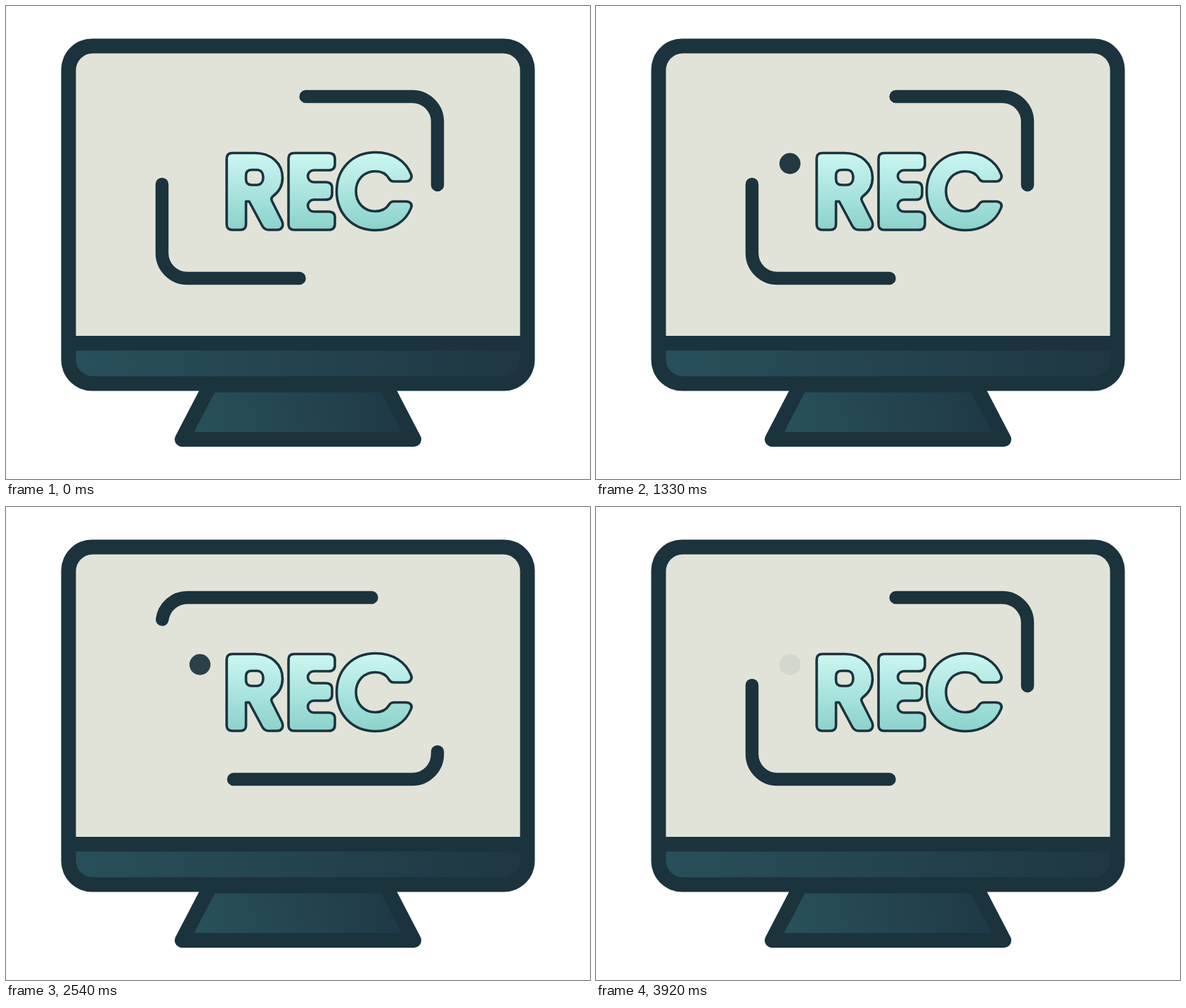
Write an HTML page with a canvas that moves like this. It is 831 px wide and 674 px high and loops after 4000 ms.

```html
<!DOCTYPE html>
<html lang="en">
<head>
<meta charset="utf-8">
<title>Recording monitor</title>
<style>
  html, body { margin: 0; width: 100%; height: 100%; overflow: hidden; background: #fff; }
  canvas { display: block; width: 831px; height: 674px; }
</style>
</head>
<body>
<canvas id="stage" width="831" height="674"></canvas>
<script>
const ctx = document.getElementById('stage').getContext('2d');
const LOOP = 4000, FPS = 24;
const DARK = '#1b333d', SCREEN = '#e1e3d9';
const DASH = 314, TURNS = 3;

// [frame, opacity] of the record dot
const DOT = [
  [1, 0], [9, 1], [12, 1], [18.3, 0], [25, 0], [32, .96], [37, .96], [43.5, .04],
  [46, .04], [47, 0], [49, 0], [56, .96], [60, .96], [68, .05],
  [72, .05], [79, .96], [86, .96], [94, .07], [96, .07]
];

const LETTERS = [
  // R
  'M322 209.5H354C377 209.5 393.5 224 393.5 245C393.5 257 388 265 380 271' +
  'C377.5 273 377 275 378.5 278L392.5 306C395.5 313 393 319 385.5 319H374' +
  'C369 319 366.5 317 364.5 313L346 278.5H341.5V311Q341.5 319 333.5 319H322' +
  'Q314 319 314 311V217.5Q314 209.5 322 209.5Z' +
  'M350 233.5H357C363 233.5 366 238 366 244S363 255 357 255H350' +
  'C344 255 341.5 252 341.5 247V241C341.5 236 344 233.5 350 233.5Z',
  // E
  'M410 209.5H459Q468 209.5 468 218V225.5Q468 234 459 234H438' +
  'A8.5 8.5 0 0 0 438 251H455Q464 251 464 259.5V267.5Q464 276 455 276H438' +
  'A8.5 8.5 0 0 0 438 293H459Q468 293 468 301.5V310.5Q468 319 459 319H410' +
  'Q402 319 402 311V217.5Q402 209.5 410 209.5Z',
  // C
  'M576.5 240C578.5 245 575 250 569 250H552C548.5 250 546.5 248.5 545 246' +
  'C541 239 534 235.5 525.5 235.5C509 235.5 498 248 498 264S509 292.5 525.5 292.5' +
  'C534 292.5 541 289 545 282.5C546.5 280 548.5 278.5 552 278.5H569' +
  'C575 278.5 578.5 282 576.5 287.5C569 307 550 319.5 526 319.5' +
  'C493 319.5 470.5 296 470.5 264S493 208.5 526 208.5C550 208.5 569 220.5 576.5 240Z'
].map(d => new Path2D(d));

// Clockwise from the lower end of the top right corner
const FRAME = new Path2D(
  'M614 165V352A36 36 0 0 1 578 388H258A36 36 0 0 1 222 352V165' +
  'A36 36 0 0 1 258 129H578A36 36 0 0 1 614 165');

const STAND = new Path2D('M290.8 540L250.5 617.5H580.5L540.2 540Z');

function gradient(x0, y0, x1, y1, from, to) {
  const g = ctx.createLinearGradient(x0, y0, x1, y1);
  g.addColorStop(0, from);
  g.addColorStop(1, to);
  return g;
}

const BEZEL_FILL = gradient(100, 0, 731, 0, '#28505a', '#1f3743');
const STAND_FILL = gradient(280, 600, 545, 550, '#285059', '#1f3a46');
const TEXT_FILL = gradient(0, 209, 0, 319, '#cbf7f2', '#8bd2cc');

const smooth = x => {
  x = Math.min(1, Math.max(0, x));
  return x * x * (3 - 2 * x);
};

function dotAlpha(f) {
  const i = DOT.findIndex(k => k[0] > f);
  if (i <= 0) return 0;
  const [f0, a0] = DOT[i - 1], [f1, a1] = DOT[i];
  return a0 + (a1 - a0) * smooth((f - f0) / (f1 - f0));
}

function box(x, y, w, h, radii, fill) {
  ctx.beginPath();
  ctx.roundRect(x, y, w, h, radii);
  ctx.fillStyle = fill;
  ctx.fill();
}

function drawMonitor() {
  ctx.lineJoin = 'round';
  ctx.lineWidth = 21;
  ctx.strokeStyle = DARK;
  ctx.fillStyle = STAND_FILL;
  ctx.fill(STAND);
  ctx.stroke(STAND);
  box(78.5, 46.5, 674, 502, 44, DARK);
  box(99.5, 67.5, 632, 402.5, [24, 24, 0, 0], SCREEN);
  box(99.5, 491, 632, 36.5, [0, 0, 24, 24], BEZEL_FILL);
}

function drawBrackets(f) {
  // One fast triple run every two seconds
  const p = smooth((f % 48 - 9.94) / 10.19);
  const run = p > .999 ? 0 : p * TURNS * 2 * DASH;
  ctx.lineCap = 'round';
  ctx.lineWidth = 18.5;
  ctx.strokeStyle = DARK;
  ctx.setLineDash([DASH, DASH]);
  ctx.lineDashOffset = DASH - 90 - run;
  ctx.stroke(FRAME);
  ctx.setLineDash([]);
}

function drawDot(f) {
  ctx.globalAlpha = dotAlpha(f);
  ctx.beginPath();
  ctx.arc(276, 224.5, 15, 0, Math.PI * 2);
  ctx.fillStyle = DARK;
  ctx.fill();
  ctx.globalAlpha = 1;
}

function drawText() {
  ctx.lineWidth = 3.6;
  ctx.strokeStyle = DARK;
  ctx.fillStyle = TEXT_FILL;
  for (const letter of LETTERS) {
    ctx.fill(letter, 'evenodd');
    ctx.stroke(letter);
  }
}

function draw(ms) {
  const f = Math.floor((ms % LOOP) * FPS / 1000 + .12);
  ctx.clearRect(0, 0, 831, 674);
  drawMonitor();
  drawBrackets(f);
  drawDot(f);
  drawText();
}

let start;
function tick(now) {
  start ??= now;
  draw(now - start);
  requestAnimationFrame(tick);
}
draw(0);
requestAnimationFrame(tick);
</script>
</body>
</html>
```
